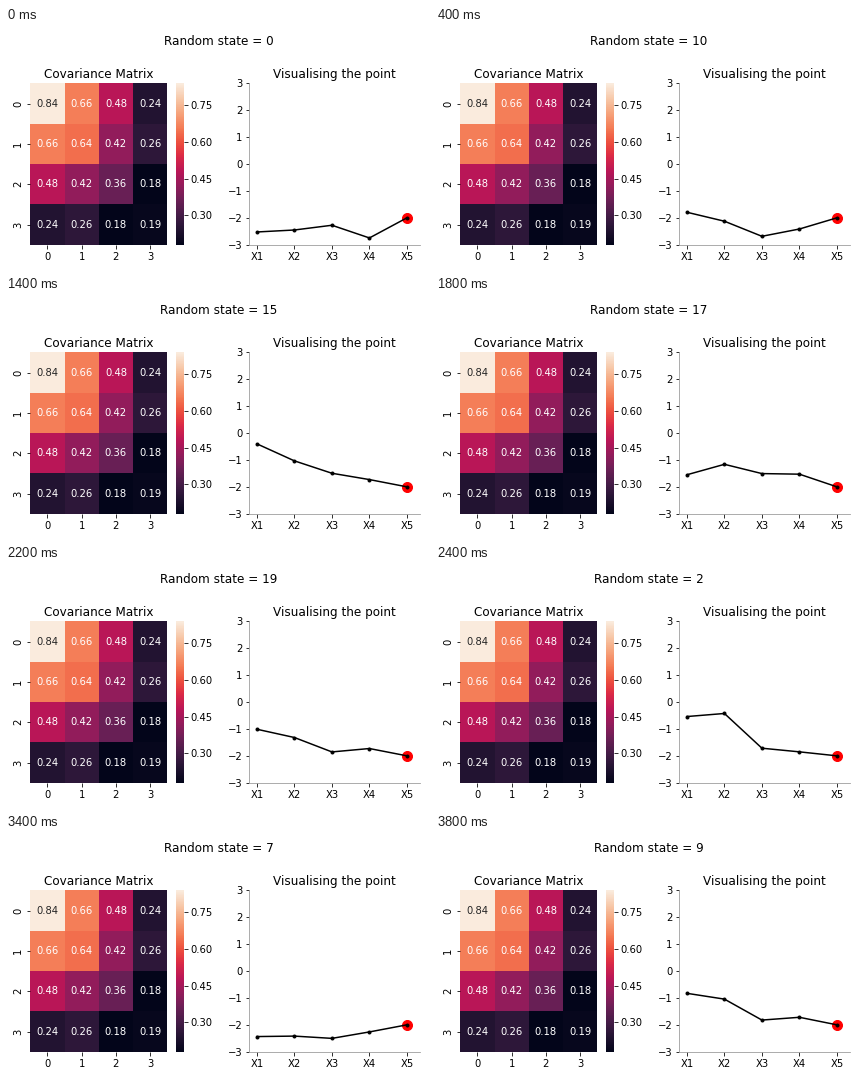
Recreate the animation shown at these times as a matplotlib script. Size 424x241 px, loop 4000 ms.

```python
import numpy as np
import matplotlib.pyplot as plt
from matplotlib.animation import FuncAnimation
from matplotlib.colors import LinearSegmentedColormap

W, H, DPI = 424, 241, 72
TOP, HEIGHT = 55.42, 161.3
plt.rcParams.update({"font.family": "DejaVu Sans", "font.size": 10,
                     "axes.titlesize": 12, "axes.titlepad": 5.5,
                     "axes.edgecolor": "0.6"})

# Five correlated variables, conditioned on the last one
FIXED = -2
lag = np.array([1, 0.9, 0.8, 0.6, 0.4])
full = lag[np.abs(np.subtract.outer(np.arange(5), np.arange(5)))]
cross = full[:4, 4]
mean = cross * FIXED
cov = full[:4, :4] - np.outer(cross, cross)

# States run in text order: 0, 1, 10, 11, ... 19, 2, 3, ...
states = sorted(range(20), key=str)


def sample(state):
    rng = np.random.RandomState(state)
    return np.append(rng.multivariate_normal(mean, cov), FIXED)


def rocket():
    sixths = "#35193e #701f57 #ad1759 #e13342 #f37651 #f6b48f".split()
    tenths = ("#221331 #451c47 #691f55 #921c5b #b91657 "
              "#d92847 #ed503e #f47d57 #f6a47c #f7c9aa").split()
    stops = [(0, "#03051a"), (1, "#faebdd")]
    for cols in (sixths, tenths):
        stops += [((i + 1) / (len(cols) + 1), c) for i, c in enumerate(cols)]
    return LinearSegmentedColormap.from_list("rocket", sorted(stops))


fig = plt.figure(figsize=(W / DPI, H / DPI), dpi=DPI, facecolor="white")


def add_axes(left, width):
    return fig.add_axes([left / W, 1 - (TOP + HEIGHT) / H, width / W, HEIGHT / H])


def hide_spines(ax, *sides):
    for side in sides:
        ax.spines[side].set_visible(False)


# Heatmap
heat = add_axes(24.35, 136.9)
mesh = heat.pcolormesh(cov, cmap=rocket())
heat.invert_yaxis()
hide_spines(heat, "left", "right", "top", "bottom")
heat.set_xticks(np.arange(4) + 0.5, range(4))
heat.set_yticks(np.arange(4) + 0.5, range(4), rotation=90, va="center")
heat.set_title("Covariance Matrix")
for (r, c), v in np.ndenumerate(cov):
    heat.text(c + 0.5, r + 0.5, f"{v:.2f}", ha="center", va="center",
              color="0.15" if v > 0.8 else "white")

bar = fig.colorbar(mesh, cax=add_axes(169.8, HEIGHT / 20),
                   ticks=[0.3, 0.45, 0.6, 0.75])
bar.outline.set_linewidth(0)

# Sampled point
line_ax = add_axes(243.15, 171.1)
hide_spines(line_ax, "top", "right")
line_ax.set(xlim=(-0.2074, 4.3553), ylim=(-3, 3), yticks=range(-3, 4))
line_ax.set_xticks(range(5), [f"X{i}" for i in range(1, 6)])
line_ax.set_title("Visualising the point")
line_ax.scatter([4], [FIXED], s=100, color="red")
line, = line_ax.plot(range(5), sample(0), "k.-")

title = fig.text(212.4 / W, 1 - 17 / H, "", size=12, ha="center", va="baseline")


def update(i):
    state = states[i]
    line.set_ydata(sample(state))
    title.set_text(f"Random state = {state}")
    return line, title


anim = FuncAnimation(fig, update, frames=len(states), interval=200, repeat=True)
plt.show()
```
